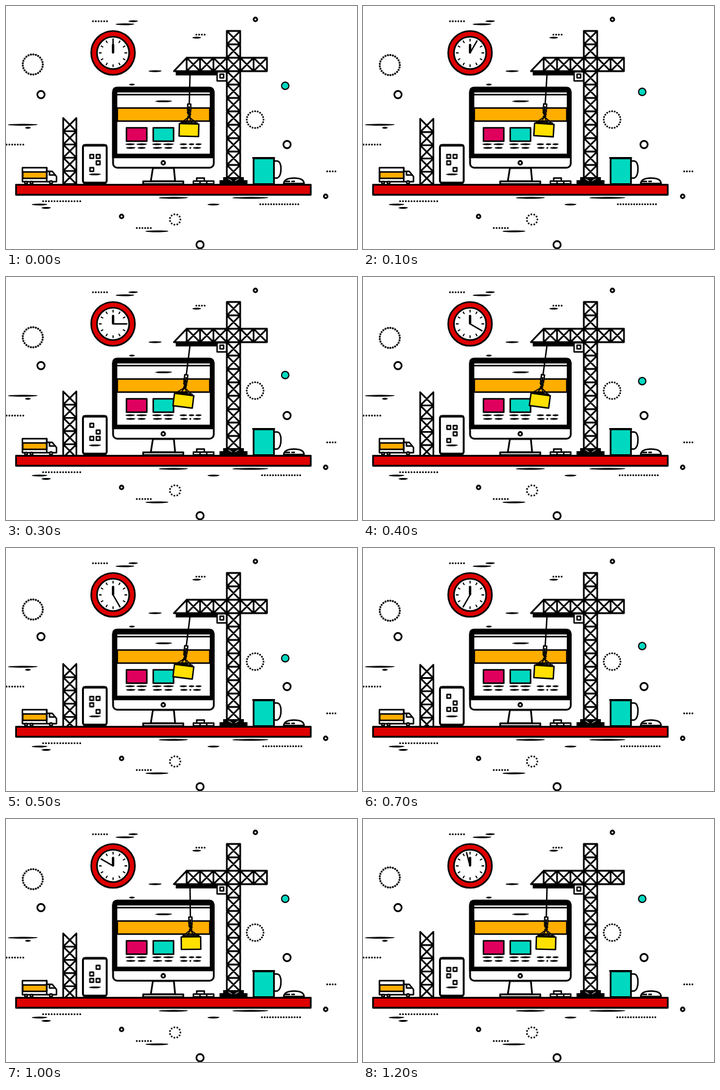
Recreate the animation shown at these times as an HTML page. Size 577 by 399 pixels, loop 1.3 s.

```html
<!DOCTYPE html>
<html lang="en">
<head>
<meta charset="utf-8">
<title>Workshop shelf</title>
<style>
  @property --i { syntax: '<number>'; inherits: true; initial-value: 0; }

  html, body { margin: 0; width: 100%; height: 100%; overflow: hidden; background: #fff; }

  /* --i counts the thirteen 100 ms poses of the loop */
  svg {
    display: block; width: 577px; height: 399px;
    --drift: min(var(--i), (12 - var(--i)) * 1.4);
    animation: tick 1300ms steps(13) infinite;
  }
  @keyframes tick { from { --i: 0; } to { --i: 13; } }

  .ink { fill: none; stroke: #000; stroke-width: 2.8; stroke-linejoin: round; stroke-linecap: round; }
  .dots { stroke-width: 3; stroke-dasharray: 0 1; }
  .solid { fill: #000; stroke: none; }
  .pen { fill: #000; stroke-width: 1.2; }
  .white { fill: #fff; }
  .red { fill: #df0000; }
  .orange { fill: #ffae00; }
  .pink { fill: #df005e; }
  .teal { fill: #00d9c0; }
  .yellow { fill: #ffe000; }

  #ring { transform: translateY(calc(var(--drift) * 1px)); }
  #trail { transform: translateX(calc(var(--drift) * 1px)); }
  #tower { transform: translateY(calc(min(var(--i), 13 - var(--i)) * 1.3px)); }
  #ball { transform: translateY(calc(min(max(var(--i) - 5, 5 - var(--i)), 17 - var(--i)) * -10px)); }
  #minute {
    transform-origin: 176px 77px;
    transform: rotate(calc(min(var(--i) * 30, 345) * 1deg));
  }
  #load {
    transform-origin: 302.5px 112px;
    transform: rotate(calc((3.5 + 4.2 * cos((var(--i) - 4) * 30deg)) * 1deg));
  }
  #lights { transform-origin: 146.2px 256px; animation: lights 1300ms step-end infinite; }
  @keyframes lights {
    0%, 30.76%, 61.53% { transform: scale(1, 1); }
    7.69%, 38.46%, 69.23%, 92.3% { transform: scale(-1, 1); }
    15.38%, 46.15%, 76.92% { transform: scale(-1, -1); }
    23.07%, 53.84%, 84.61% { transform: scale(1, -1); }
  }
</style>
</head>
<body>
<svg viewBox="0 0 577 399" class="ink">
  <clipPath id="aboveShelf"><rect x="80" y="150" width="50" height="143"/></clipPath>

  <g id="scatter"></g>
  <g id="ring"><circle class="dots" cx="44" cy="96" r="16.5" pathLength="25" style="stroke-width:3.4"/></g>
  <g id="trail"></g>
  <circle id="ball" class="teal" cx="459" cy="181" r="6" stroke-width="1.9"/>

  <g id="clock">
    <circle class="red" cx="176" cy="77" r="36" stroke-width="2.6"/>
    <circle class="white" cx="176" cy="77" r="26.5" stroke-width="2.6"/>
    <path id="hours" stroke-width="1.8"/>
    <path d="M176 76V64" stroke-width="4"/>
    <path id="minute" d="M176 77V54.5" stroke-width="2.3"/>
  </g>

  <g id="monitor">
    <path class="white" d="M241.5 266h34.5l2 22h-40z"/>
    <rect class="white" x="225.5" y="288" width="66" height="4.5"/>
    <rect class="white" x="176" y="134.5" width="165.5" height="131" rx="7" stroke-width="3"/>
    <path class="solid" d="M174.5 250V141q0-8.5 8.5-8.5H334q8.500 0 8.500 8.500V250z"/>
    <rect class="solid" style="fill:#fff" x="183" y="142" width="152" height="100.5"/>
    <path d="M183 145.5h152" stroke-width="2.5"/>
    <path class="orange" d="M183 167.500h152v21.500H183z" stroke-width="2.4"/>
    <rect class="pink" x="198" y="200" width="33.5" height="22" stroke-width="2.4"/>
    <rect class="teal" x="242" y="200" width="33.5" height="22" stroke-width="2.4"/>
    <g id="captions"></g>
    <circle cx="258.5" cy="257.5" r="3"/>
  </g>

  <g id="cabinet">
    <rect class="white" x="126.5" y="228" width="39" height="63" rx="4" stroke-width="3.2"/>
    <path d="M128 228.800h36M129 290.500h34" stroke-width="3.8"/>
    <path id="lights" d="M138 244h6v6h-6zM148.5 244h6v6h-6zM148.5 254.5h6v6h-6zM138 265.5h6v6h-6z" stroke-width="2.3"/>
    <g id="sill"></g>
  </g>

  <g clip-path="url(#aboveShelf)"><path id="tower"/></g>

  <g id="truck" stroke-width="2.5">
    <path class="white" d="M67 271.5h9l7 8.5v8.5H27V265.5h40z"/>
    <path class="orange" d="M27.5 272.5h39.5v10.500H27.500z"/>
    <path d="M67 265.5v22M71.5 272v5.500h9"/>
    <circle class="white" cx="33" cy="290" r="2"/>
    <circle class="white" cx="42" cy="290" r="2"/>
    <circle class="white" cx="74" cy="289.5" r="2.200"/>
  </g>

  <g id="crane">
    <path id="mast"/>
    <path class="solid" d="M279 106h68v8h-68z"/>
    <path class="white" d="M347 108h15.500v15H347z" stroke-width="2.300"/>
    <path d="M351.800 112h6v6h-6z" stroke-width="2.300"/>
    <path class="solid" d="M357 281h34v5h6v7h-46v-7h6z"/>
    <path stroke="#fff" stroke-width="1" d="M366 284l5 3M382 284l-5 3"/>
  </g>

  <path class="white" stroke-width="2.4" d="M308 292v-4.500h5.500v-5h12.500v5h15.500v4.500zM313.500 287.500h12.500M319 287.500v4.500M330 287.500v4.500"/>

  <g id="desk">
    <path d="M441 254.500h5q6 1 6 13t-6 15h-5" stroke-width="2.500"/>
    <path class="teal" d="M407 250h33.500v42.500H407z"/>
    <path d="M406 249.500h35"/>
    <path class="white" d="M456.500 291.500q1-9 17-9t16.500 9z" stroke-width="2.600"/>
    <path d="M459 288h7M470 288h4" stroke-width="2.400"/>
  </g>

  <rect class="red" x="16.500" y="293.500" width="484.500" height="16.500"/>

  <g id="load" stroke-width="2.3">
    <path d="M302.500 112V161"/>
    <path class="white" d="M300 161h5v11h-5z"/>
    <path d="M302.500 166v6l-2.500 3 5 2.500-4 4M305 174l-4 3 3.500 4" stroke-width="2.600"/>
    <path d="M302.500 182L289 192.500M302.500 182L316 192.500M302.500 182l-5 9M302.500 182l5 9" stroke-width="1.700"/>
    <path d="M290 191.800h26" stroke-width="2.800"/>
    <path class="yellow" d="M287 193.500h32v20.500h-32z"/>
  </g>
</svg>

<script>
  const el = id => document.getElementById(id);
  const draw = (id, parts) => el(id).innerHTML = parts.join('');

  // Pen stroke, fuller in the middle
  const dash = ([x1, x2, y]) => {
    const a = x1 + 1, b = x2 - 1, p = a + (b - a) * 0.25, q = b - (b - a) * 0.25;
    return `<path class="pen" d="M${a} ${y}C${p} ${y - 1.3} ${q} ${y - 1.3} ${b} ${y - 0.3}
      C${q} ${y + 1.3} ${p} ${y + 1.3} ${a} ${y}z"/>`;
  };
  const dots = ([x1, x2, y]) =>
    `<path class="dots" d="M${x1} ${y}H${x2}" pathLength="${Math.round((x2 - x1) / 4.6)}"/>`;
  const circle = ([x, y, r]) => `<circle cx="${x}" cy="${y}" r="${r}"/>`;
  const dotRing = ([x, y, r, n]) =>
    `<circle class="dots" cx="${x}" cy="${y}" r="${r}" pathLength="${n}"/>`;

  const cross = (x, y, s) => `M${x} ${y}l${s} ${s}m0 ${-s}l${-s} ${s}`;
  const column = (x, y, s, n) => {
    let d = `M${x} ${y}v${s * n}M${x + s} ${y}v${s * n}`;
    for (let k = 0; k < n; k++) d += cross(x, y + k * s, s) + `M${x} ${y + (k + 1) * s}h${s}`;
    return d;
  };
  const beam = (x, y, s, n) => {
    let d = `M${x} ${y}h${s * n}M${x} ${y + s}h${s * n}`;
    for (let k = 0; k < n; k++) d += cross(x + k * s, y, s) + `M${x + (k + 1) * s} ${y}v${s}`;
    return d;
  };

  draw('scatter', [
    ...[[180, 211, 30], [201, 217, 25], [306, 321, 52], [234, 256, 107], [202, 212, 129],
        [3, 52, 195], [31, 41, 200], [42, 68, 326], [58, 74, 331.5], [251, 299, 315],
        [372, 431, 315], [331, 351, 326], [229, 267, 370]].map(dash),
    ...[[143, 166, 25], [313, 331, 47], [1, 33, 227.5], [528, 546, 271.5],
        [61, 122, 320.5], [215, 238, 364.5]].map(dots),
    ...[[410, 22, 3], [57.5, 145.5, 6], [462, 227.5, 6], [525.5, 312.5, 3],
        [190, 345.5, 3], [319, 392, 6]].map(circle),
    dotRing([409.5, 186.5, 13.8, 20]),
    dotRing([278, 350.5, 8.7, 11])
  ]);
  draw('trail', [dots([418, 485, 325.5])]);
  draw('sill', [dash([136, 156, 276.5])]);

  draw('captions', [
    [245, 273, 156.5],
    ...[197, 241].flatMap(x => [
      [x - 1, x + 15, 227], [x + 17, x + 35, 227], [x, x + 16, 233], [x + 19, x + 33, 233]
    ]),
    [285, 298, 227], [300, 310, 227], [311, 322, 227],
    [286, 299, 233], [301, 305, 233], [307, 321, 233]
  ].map(dash));

  el('hours').setAttribute('d', Array.from({ length: 12 }, (_, k) => {
    const a = k * Math.PI / 6, at = r => `${176 + r * Math.sin(a)} ${77 - r * Math.cos(a)}`;
    return `M${at(19.5)}L${at(22.5)}`;
  }).join(''));

  el('tower').setAttribute('d', column(94, 184, 21.7, 6));
  el('mast').setAttribute('d',
    'M363 41h22' + column(363, 41, 22, 11) + 'M297 85v22' + beam(297, 85, 22, 6) + 'M297 85l-21 22h21');
</script>
</body>
</html>
```
